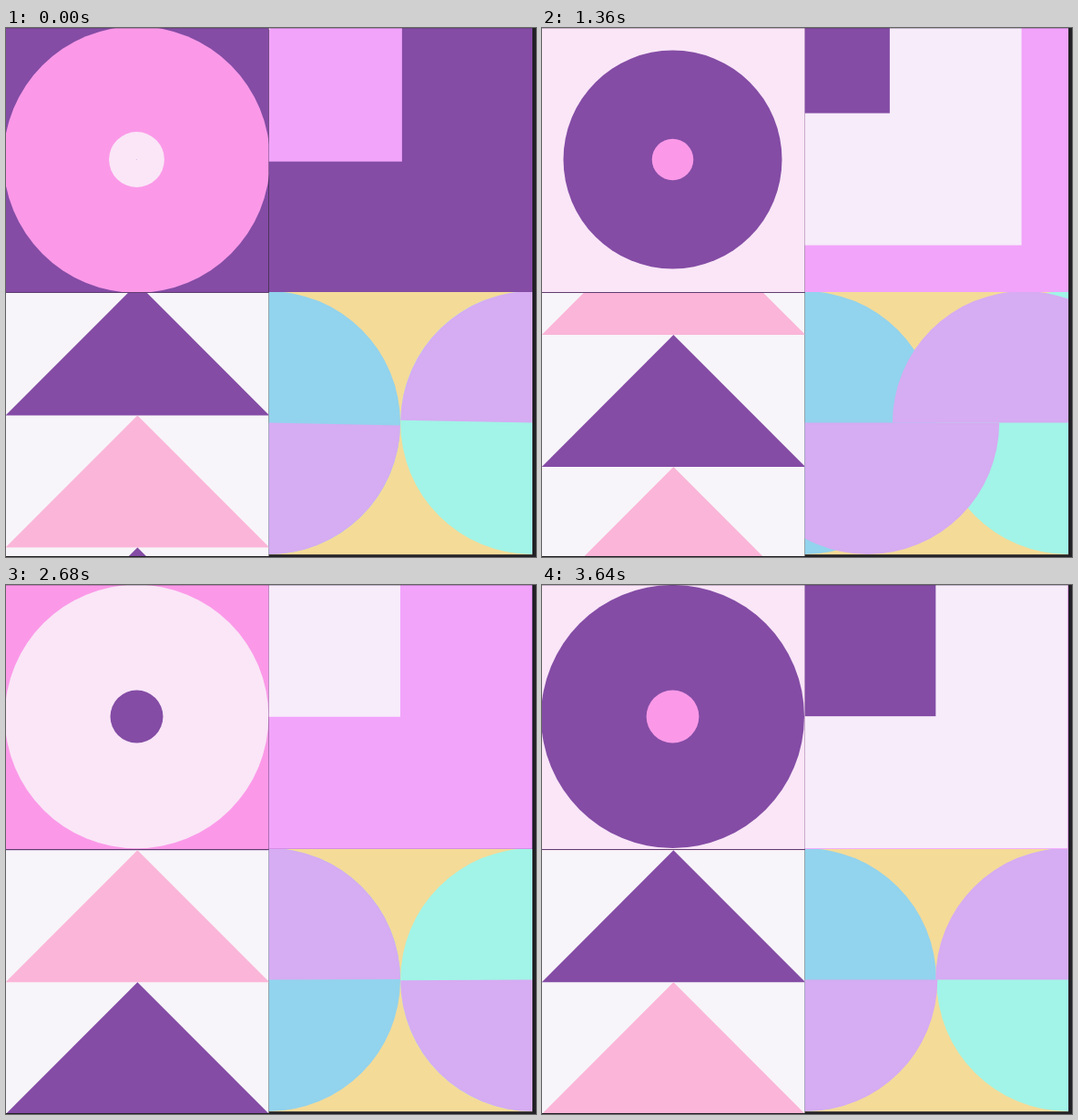
An HTML page with a canvas for the animation above (3680 ms loop, 582 by 581 pixels).

```html
<!DOCTYPE html>
<html lang="en">
<head>
<meta charset="utf-8">
<title>Geometric tiles</title>
<style>
html, body { margin: 0; width: 100%; height: 100%; overflow: hidden; background: #222126; }
canvas { display: block; }
</style>
</head>
<body>
<canvas id="stage" width="582" height="581"></canvas>
<script>
const ctx = document.getElementById('stage').getContext('2d');

const LOOP = 3680, STEP = 40;
const CYCLE = 1920, OFFSET = 175, HALF = 1000;

const PURPLE = '#844ca5';
const RINGS = [PURPLE, '#fb99e8', '#fae6f7'];
const SQUARES = [PURPLE, '#f2a4fb', '#f7ecfa'];
const TRIANGLES = [PURPLE, '#fbb5d8'];
const PAPER = '#f7f5f9', SAND = '#f4db98', BLUE = '#92d3ed', LILAC = '#d6acf2', MINT = '#a1f4e7';

// Cubic bezier easing with control points (a, 0) and (b, 1).
function ease(x, a, b) {
  if (x <= 0) return 0;
  if (x >= 1) return 1;
  let lo = 0, hi = 1;
  for (let i = 0; i < 30; i++) {
    const s = (lo + hi) / 2, r = 1 - s;
    if (3 * r * r * s * a + 3 * r * s * s * b + s * s * s < x) lo = s; else hi = s;
  }
  return lo * lo * (3 - 2 * lo);
}

const progress = (time, start, duration, a, b) => ease((time - start) / duration, a, b);

function rect(x, y, w, h, color) {
  ctx.fillStyle = color;
  ctx.fillRect(x, y, w, h);
}

function disc(x, y, r, color, from = 0, to = Math.PI * 2) {
  ctx.fillStyle = color;
  ctx.beginPath();
  ctx.arc(x, y, Math.max(0, r), from, to);
  ctx.fill();
}

function tile(x, y, w, h, color, paint) {
  ctx.save();
  ctx.beginPath();
  ctx.rect(x, y, w, h);
  ctx.clip();
  rect(x, y, w, h, color);
  paint();
  ctx.restore();
}

function drawRings(phase, time) {
  const p = progress(time, 65, 920, 0.7, 0.08);
  tile(0, 0, 288.5, 290, RINGS[phase], () => {
    [145 + 116 * p, 29 + 116 * p, 29 * p].forEach((r, i) =>
      disc(143.5, 144.5, r, RINGS[(phase + 1 + i) % 3]));
  });
}

function drawSquares(phase, time) {
  const p = progress(time, 65, 920, 0.7, 0.218);
  tile(288.5, 0, 289.5, 290, SQUARES[phase], () => {
    [1 + p, p].forEach((k, i) =>
      rect(288.5, 0, 144.7 * k, 145 * k, SQUARES[(phase + 1 + i) % 3]));
  });
}

function drawTriangles(phase, time) {
  const p = progress(time, -25, 940, 0.5, 0.5);
  tile(0, 291, 288.7, 289, PAPER, () => {
    for (let i = 0; i < 3; i++) {
      const top = 291.2 + 145 * (i - p);
      ctx.fillStyle = TRIANGLES[(phase + i) % 2];
      ctx.beginPath();
      ctx.moveTo(144.4, top);
      ctx.lineTo(289.2, top + 145);
      ctx.lineTo(-0.4, top + 145);
      ctx.fill();
    }
  });
}

function drawDiscs(phase, time) {
  const left = 288.5, right = 577.7, y = 433.6, r = 144.5, span = right - left;
  tile(288.7, 290, 289.3, 288.5, SAND, () => {
    disc(left, y, r, BLUE);
    disc(right, y, r, MINT);
    if (phase === 0) {
      const turn = Math.PI * progress(time, 95, 890, 0.7, 0.1);
      disc(left, y, r, LILAC, turn, turn + Math.PI);
      disc(right, y, r, LILAC, turn + Math.PI, turn + Math.PI * 2);
    } else {
      const upper = progress(time, 65, 920, 0.7, 0);
      const lower = progress(time, 65, 920, 0.7, 0.11);
      disc(left + span * upper, y, r, LILAC, Math.PI, Math.PI * 2);
      disc(right - span * lower, y, r, LILAC, 0, Math.PI);
    }
  });
}

function draw(t) {
  const cycleTime = (t + OFFSET) % CYCLE;
  const phase = cycleTime < HALF ? 0 : 1;
  const time = cycleTime - phase * HALF;
  rect(0, 0, 582, 581, '#222126');
  drawRings(phase, time);
  drawSquares(phase, time);
  drawTriangles(phase, time);
  drawDiscs(phase, time);
  rect(0, 290, 288.5, 1, '#5f3c70');
  rect(0, 0, 578, 1, 'rgba(70, 50, 80, 0.3)');
}

const start = performance.now();
function frame() {
  const t = (performance.now() - start) % LOOP;
  draw(Math.floor(t / STEP) * STEP);
  requestAnimationFrame(frame);
}
frame();
</script>
</body>
</html>
```
